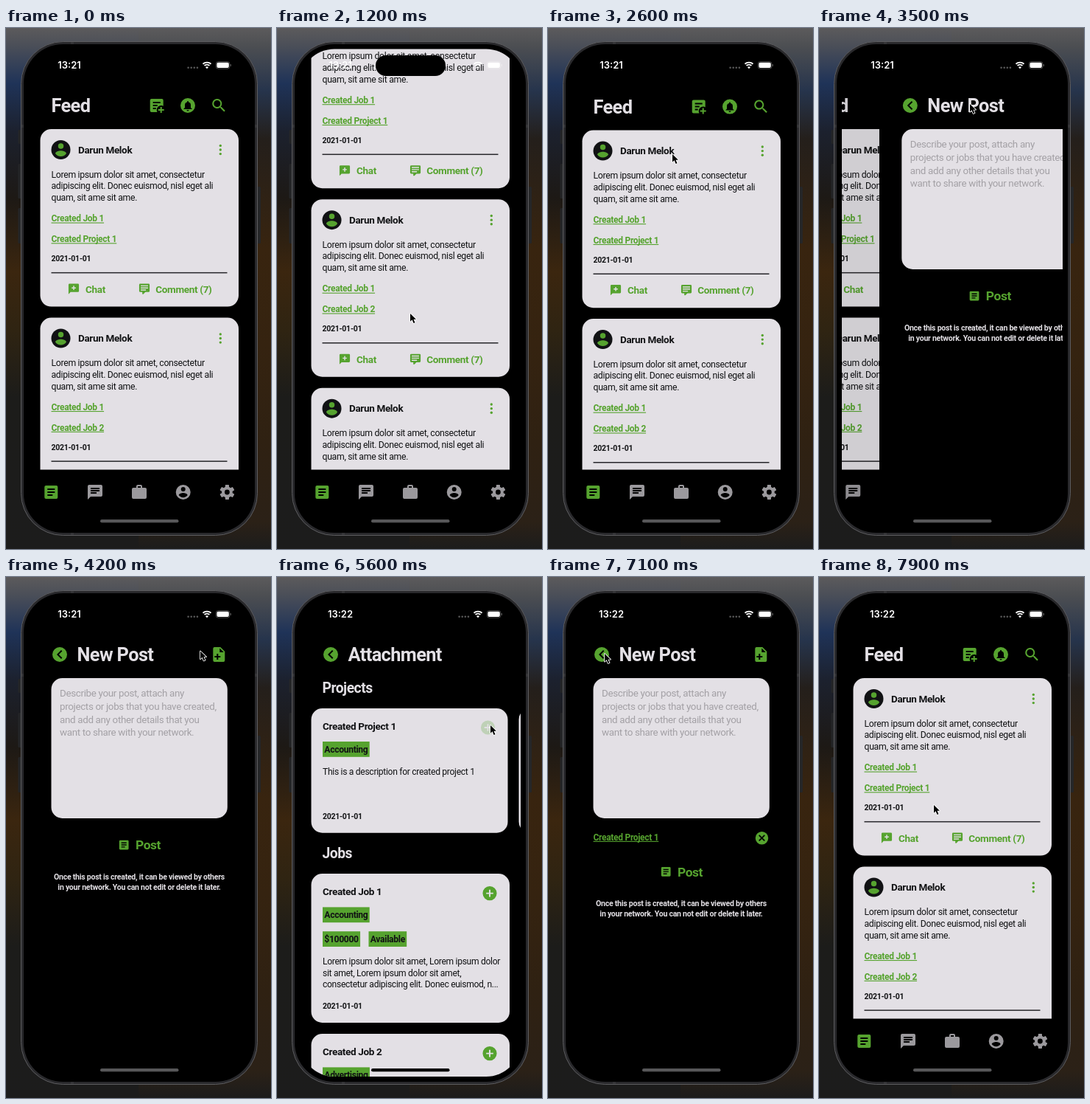
Write an HTML page with a canvas that moves like this. It is 360 px wide and 706 px high and loops after 8 s.

```html
<!DOCTYPE html>
<html lang="en">
<head>
<meta charset="utf-8">
<title>Feed app</title>
<style>
  html, body { margin: 0; width: 100%; height: 100%; overflow: hidden; background: #111; }
  canvas { display: block; width: 360px; height: 706px; }
</style>
</head>
<body>
<canvas id="stage"></canvas>
<script>
const LOOP = 8000;
const GREEN = '#56a32f', LIGHT = '#e3e0e5', DARK = '#111214', GRAY = '#9b999d';
const SCREEN = { x: 31, y: 28.5, w: 300, h: 648.5, r: 47 };

const canvas = document.getElementById('stage');
const dpr = window.devicePixelRatio || 1;
canvas.width = 360 * dpr;
canvas.height = 706 * dpr;
const ctx = canvas.getContext('2d');

const DISC = 'M12 2a10 10 0 1 0 0 20 10 10 0 1 0 0-20';
const SHEET = 'M5 3h14a2 2 0 0 1 2 2v14a2 2 0 0 1-2 2H5a2 2 0 0 1-2-2V5a2 2 0 0 1 2-2';
const BUBBLE = 'M20 2H4a2 2 0 0 0-2 2v18l4-4h14a2 2 0 0 0 2-2V4a2 2 0 0 0-2-2';
const PERSON = 'M12 5a3 3 0 1 0 0 6 3 3 0 1 0 0-6M12 19.2C9.5 19.2 7.3 17.9 6 16C6 14 10 12.9 12 12.9C14 12.9 18 14 18 16C16.7 17.9 14.5 19.2 12 19.2';
const icons = {
  sheet: SHEET + 'M7 7h10v2H7zM7 11h10v2H7zM7 15h7v2H7z',
  sheetPlus: 'M17 14h2v3h3v2h-3v3h-2v-3h-3v-2h3zM5 3h14a2 2 0 0 1 2 2v7.8a5 5 0 0 0-3-.8 6 6 0 0 0-6 6 6 6 0 0 0 .8 3H5a2 2 0 0 1-2-2V5a2 2 0 0 1 2-2M7 7h10v2H7zM7 11h6v2H7zM7 15h4v2H7z',
  bell: DISC + 'M12 6a1 1 0 0 1 1 1v.4a4 4 0 0 1 3 3.9V15l1.5 1.3v.7h-11v-.7L8 15v-3.7a4 4 0 0 1 3-3.9V7a1 1 0 0 1 1-1m-1.5 12h3a1.5 1.5 0 0 1-3 0z',
  search: 'M9.5 3a6.5 6.5 0 0 1 4.9 10.7l.3.3h.8l5 5-1.5 1.5-5-5v-.8l-.3-.3A6.5 6.5 0 1 1 9.5 3m0 2a4.5 4.5 0 1 0 0 9 4.5 4.5 0 1 0 0-9',
  message: BUBBLE + 'M6 6h12v2H6zM6 9h12v2H6zM6 12h8v2H6z',
  chat: BUBBLE + 'M11 6h2v3h3v2h-3v3h-2v-3H8V9h3z',
  comment: 'M4 2h16a2 2 0 0 1 2 2v12a2 2 0 0 1-2 2h-6l-3.8 3.7Q8 22.5 8 21v-3H4a2 2 0 0 1-2-2V4a2 2 0 0 1 2-2M5 5h14v2H5zM5 9h14v2H5zM5 13h10v2H5z',
  briefcase: 'M10 2h4a2 2 0 0 1 2 2v2h4a2 2 0 0 1 2 2v11a2 2 0 0 1-2 2H4a2 2 0 0 1-2-2V8a2 2 0 0 1 2-2h4V4a2 2 0 0 1 2-2m0 2v2h4V4z',
  account: DISC + PERSON,
  person: PERSON,
  back: DISC + 'M15.4 16.6L10.8 12l4.6-4.6L14 6l-6 6 6 6z',
  filePlus: 'M14 2H6a2 2 0 0 0-2 2v16a2 2 0 0 0 2 2h12a2 2 0 0 0 2-2V8zM13 3.5L18.5 9H13zM11 11v3h3v2h-3v3H9v-3H6v-2h3v-3z',
  plus: DISC + 'M11 7h2v4h4v2h-4v4h-2v-4H7v-2h4z',
  close: DISC + 'M8.4 7L12 10.6 15.6 7 17 8.4 13.4 12l3.6 3.6-1.4 1.4-3.6-3.6L8.4 17 7 15.6l3.6-3.6L7 8.4z'
};
for (const k in icons) icons[k] = new Path2D(icons[k]);
const arrow = new Path2D('M0 0V12.2L2.9 9.5 5.2 14.7 7.4 13.8 5.1 8.7H9z');

const clamp = v => Math.max(0, Math.min(1, v));
const smooth = v => v * v * (3 - 2 * v);
const easeOut = (t, start, len) => 1 - Math.pow(1 - clamp((t - start) / len), 3);

// Eased interpolation through [time, ...values] keys
function track(keys, t) {
  if (t <= keys[0][0]) return keys[0].slice(1);
  for (let i = 1; i < keys.length; i++) {
    const a = keys[i - 1], b = keys[i];
    if (t <= b[0]) {
      const p = smooth((t - a[0]) / (b[0] - a[0]));
      return a.slice(1).map((v, j) => v + (b[j + 1] - v) * p);
    }
  }
  return keys[keys.length - 1].slice(1);
}

// Opacity of a touched button
function press(t, at) {
  return 1 - 0.75 * clamp((t - at) / 60) * (1 - clamp((t - at - 130) / 200));
}

function box(x, y, w, h, r, fill) {
  ctx.beginPath();
  ctx.roundRect(x, y, w, h, r);
  ctx.fillStyle = fill;
  ctx.fill();
}

function disc(x, y, r, fill) {
  ctx.beginPath();
  ctx.arc(x, y, r, 0, Math.PI * 2);
  ctx.fillStyle = fill;
  ctx.fill();
}

// Slightly tightened tracking for a narrow look
function setFont(size, weight) {
  ctx.font = `${weight} ${size}px Roboto, sans-serif`;
  ctx.letterSpacing = `${-0.025 * size}px`;
}

function text(str, x, y, size, color = DARK, weight = 700, align = 'left') {
  setFont(size, weight);
  ctx.textAlign = align;
  ctx.fillStyle = color;
  ctx.fillText(str, x, y);
  return ctx.measureText(str).width;
}

function lines(list, x, y, step, size, color, weight, align) {
  list.forEach((s, i) => text(s, x, y + i * step, size, color, weight, align));
}

function link(str, x, y) {
  const w = text(str, x, y, 12, GREEN);
  ctx.fillRect(x, y + 1.3, w, 1.1);
}

function icon(name, x, y, size = 24, color = GREEN, alpha = 1) {
  ctx.save();
  ctx.globalAlpha *= alpha;
  ctx.translate(x, y);
  ctx.scale(size / 24, size / 24);
  ctx.translate(-12, -12);
  ctx.fillStyle = color;
  ctx.fill(icons[name], 'evenodd');
  ctx.restore();
}

function cog(x, y) {
  ctx.save();
  ctx.translate(x, y);
  ctx.fillStyle = GRAY;
  for (let i = 0; i < 6; i++) {
    ctx.beginPath();
    ctx.roundRect(-2.6, -10, 5.2, 5, 0.8);
    ctx.fill();
    ctx.rotate(Math.PI / 3);
  }
  ctx.beginPath();
  ctx.arc(0, 0, 5.4, 0, Math.PI * 2);
  ctx.lineWidth = 4;
  ctx.strokeStyle = GRAY;
  ctx.stroke();
  ctx.restore();
}

function postCard(y, links) {
  const shift = links.length * 27.8;
  box(46.5, y, 269.5, 185 + shift, 15, LIGHT);
  disc(74.5, y + 28, 13, DARK);
  icon('person', 74.5, y + 28, 30);
  text('Darun Melok', 98, y + 32.8, 13.5);
  for (const dy of [-5.6, 0, 5.6]) disc(291.3, y + 28 + dy, 1.7, GREEN);
  lines(['Lorem ipsum dolor sit amet, consectetur', 'adipiscing elit. Donec euismod, nisl eget ali', 'quam, sit ame sit ame.'],
    61.5, y + 65.5, 15.8, 12.25, DARK, 400);
  links.forEach((s, i) => link(s, 61.5, y + 125.2 + i * 27.8));
  const d = y + shift;
  text('2021-01-01', 61.5, d + 123.5, 10.5);
  ctx.fillStyle = '#26262a';
  ctx.fillRect(61.5, d + 138.3, 239, 1.5);
  icon('chat', 92, d + 161, 17);
  text('Chat', 108, d + 166, 13.5, GREEN);
  icon('comment', 188, d + 161, 17);
  text('Comment (7)', 203.3, d + 166, 13.5, GREEN);
}

function feed(t) {
  const [scroll] = track([[450, 0], [1350, 173], [2050, 173], [2480, -5], [2600, -1.6], [2760, 0]], t);
  ctx.save();
  ctx.beginPath();
  ctx.rect(0, 0, 360, 598.5);
  ctx.clip();
  ctx.translate(0, -scroll);
  text('Feed', 61.5, 114.2, 25.4, LIGHT);
  icon('sheetPlus', 204.7, 105, 24, GREEN, press(t, 3220));
  icon('bell', 247, 105);
  icon('search', 289.3, 105);
  postCard(137, ['Created Job 1', 'Created Project 1']);
  postCard(392.5, ['Created Job 1', 'Created Job 2']);
  postCard(648, []);
  ctx.restore();
  icon('sheet', 61.3, 629);
  icon('message', 121, 629, 24, GRAY);
  icon('briefcase', 181, 629, 24, GRAY);
  icon('account', 240.7, 629, 24, GRAY);
  cog(300.4, 629);
}

function header(title, alpha) {
  icon('back', 73, 105, 24, GREEN, alpha);
  text(title, 96.5, 114.2, 25.4, LIGHT);
}

function newPost(t) {
  const attached = t > 5650;
  const y = attached ? 36.4 : 0;
  header('New Post', press(t, 7130));
  icon('filePlus', 289.3, 105, 24, GREEN, press(t, 4420));
  box(61.5, 137, 239.3, 190, 15, LIGHT);
  lines(['Describe your post, attach any', 'projects or jobs that you have created,', 'and add any other details that you', 'want to share with your network.'],
    73, 162.3, 17.7, 13.4, '#a3a0a5', 400);
  if (attached) {
    link('Created Project 1', 61.5, 356.5);
    icon('close', 290.5, 353.7, 21);
  }
  icon('sheet', 160.2, 363 + y, 17);
  text('Post', 176, 369.3 + y, 17.4, GREEN);
  lines(['Once this post is created, it can be viewed by others', 'in your network. You can not edit or delete it later.'],
    181, 409.8 + y, 13.9, 10.55, LIGHT, 700, 'center');
}

function tag(str, x, y) {
  setFont(12.1, 700);
  ctx.fillStyle = GREEN;
  ctx.fillRect(x, y, ctx.measureText(str).width + 4.6, 20.8);
  text(str, x + 2.3, y + 14.6, 12.1);
}

function jobCard(y, title, field) {
  box(46.5, y, 269.5, 202, 15, LIGHT);
  text(title, 62, y + 29.3, 13.5);
  icon('plus', 289, y + 26.6, 23);
  tag(field, 62, y + 45.4);
  tag('$100000', 62, y + 78.2);
  tag('Available', 124.5, y + 78.2);
  lines(['Lorem ipsum dolor sit amet, Lorem ipsum dolor', 'sit amet, Lorem ipsum dolor sit amet,', 'consectetur adipiscing elit. Donec euismod, n...'],
    62, y + 123, 15.7, 12.1, DARK, 400);
  text('2021-01-01', 62, y + 183, 10.5);
}

function attachment(t) {
  header('Attachment', press(t, 6480));
  text('Projects', 61.5, 156.7, 19.3, LIGHT);
  box(46.5, 178, 267, 168.7, 15, LIGHT);
  box(328.5, 178, 267, 168.7, 15, LIGHT);
  text('Created Project 1', 62, 207, 13.5);
  icon('plus', 286.5, 204, 23, GREEN, press(t, 5510));
  tag('Accounting', 62, 223);
  text('This is a description for created project 1', 62, 268, 12.1, DARK, 400);
  text('2021-01-01', 62, 328, 10.5);
  text('Jobs', 61.5, 381.3, 19.3, LIGHT);
  jobCard(402, 'Created Job 1', 'Accounting');
  jobCard(619, 'Created Job 2', 'Advertising');
}

// Push transition: the lower page drifts left while the upper one slides over it
function stack(p, under, over) {
  if (p < 1) {
    ctx.save();
    ctx.translate(-0.3 * SCREEN.w * p, 0);
    under();
    ctx.restore();
    if (p > 0) {
      ctx.fillStyle = `rgba(0,0,0,${0.1 * p})`;
      ctx.fillRect(SCREEN.x, SCREEN.y, SCREEN.w, SCREEN.h);
    }
  }
  if (p > 0) {
    ctx.save();
    ctx.translate(SCREEN.w * (1 - p), 0);
    ctx.beginPath();
    ctx.rect(SCREEN.x, SCREEN.y, SCREEN.w, SCREEN.h);
    ctx.clip();
    ctx.fillStyle = '#000';
    ctx.fillRect(SCREEN.x, SCREEN.y, SCREEN.w, SCREEN.h);
    over();
    ctx.restore();
  }
}

function wall(x, w, stops) {
  const g = ctx.createLinearGradient(0, 0, 0, 706);
  stops.forEach(([y, c]) => g.addColorStop(y / 706, c));
  ctx.fillStyle = g;
  ctx.fillRect(x, 0, w, 706);
}

function phone() {
  wall(0, 180, [[0, '#5c5b5c'], [25, '#4a4e58'], [75, '#1f3358'], [140, '#1c212e'], [230, '#1d1915'], [330, '#3b260f'], [410, '#2f2412'], [500, '#1c1c1a'], [706, '#1c1c1c']]);
  wall(180, 180, [[0, '#5c5b5c'], [25, '#4c4e52'], [85, '#26344c'], [150, '#241f1b'], [300, '#38240f'], [430, '#352310'], [560, '#2f2112'], [670, '#2b2117'], [706, '#1c1c1c']]);
  for (const [x, y, h] of [[16.5, 138, 19], [16.5, 184, 47], [16.5, 244, 48], [341, 215, 77]]) box(x, y, 5, h, 1.5, '#252628');
  box(20.5, 18.5, 321, 669, 57, '#29292c');
  ctx.lineWidth = 1;
  ctx.strokeStyle = '#5c5c5f';
  ctx.stroke();
  box(24, 22, 314, 662, 53.5, '#000');
  ctx.fillStyle = '#343437';
  for (const [x, y, w, h] of [[88, 19, 4, 3], [88, 684, 4, 3], [21, 131, 3, 4], [338, 131, 3, 4]]) ctx.fillRect(x, y, w, h);
}

function statusBar(t) {
  const faint = 'rgba(255,255,255,0.35)';
  box(134, 37, 95, 28, 14, '#000');
  ctx.font = '600 13px Inter, sans-serif';
  ctx.letterSpacing = '0px';
  ctx.textAlign = 'center';
  ctx.fillStyle = '#fff';
  ctx.fillText(t < 5000 ? '13:21' : '13:22', 86, 55.3);
  for (let i = 0; i < 4; i++) disc(247.6 + i * 4.1, 53.7, 1.3, faint);
  ctx.strokeStyle = '#fff';
  ctx.lineWidth = 1.9;
  for (const r of [8, 4.9]) {
    ctx.beginPath();
    ctx.arc(273, 54.6, r, -2.33, -0.81);
    ctx.stroke();
  }
  ctx.beginPath();
  ctx.moveTo(273, 55.2);
  ctx.arc(273, 55.2, 2.8, -2.36, -0.78);
  ctx.fillStyle = '#fff';
  ctx.fill();
  ctx.beginPath();
  ctx.roundRect(285.3, 45.6, 18.6, 9.6, 3);
  ctx.strokeStyle = faint;
  ctx.lineWidth = 0.8;
  ctx.stroke();
  box(286.4, 46.7, 16.4, 7.4, 2, '#fff');
  box(304.7, 48.9, 1.2, 3, 0.6, faint);
}

function cursor(t) {
  if (t < 100) return;
  const [x, y] = track([[100, 349, 430], [300, 340, 425], [850, 181, 387], [2200, 181, 387], [2600, 169, 171], [2950, 200, 106], [3120, 205, 103],
    [3950, 205, 103], [4200, 264, 100.5], [4380, 287, 102], [4950, 287, 102], [5420, 290, 201], [5800, 290, 201], [6380, 77, 104],
    [7350, 77, 104], [7850, 156, 309]], t);
  ctx.save();
  ctx.translate(x, y);
  ctx.scale(0.88, 0.88);
  ctx.lineJoin = 'round';
  ctx.lineWidth = 1.9;
  ctx.strokeStyle = '#fff';
  ctx.stroke(arrow);
  ctx.fillStyle = '#000';
  ctx.fill(arrow);
  ctx.restore();
}

function draw(t) {
  ctx.setTransform(dpr, 0, 0, dpr, 0, 0);
  phone();
  const post = easeOut(t, 3300, 450) - easeOut(t, 7200, 450);
  const attach = easeOut(t, 4500, 450) - easeOut(t, 6550, 450);
  ctx.save();
  ctx.beginPath();
  ctx.roundRect(SCREEN.x, SCREEN.y, SCREEN.w, SCREEN.h, SCREEN.r);
  ctx.clip();
  stack(post, () => feed(t), () => stack(attach, () => newPost(t), () => attachment(t)));
  ctx.restore();
  statusBar(t);
  box(128, 666, 106.5, 4.3, 2.2, attach > 0.5 ? '#000' : '#575759');
  cursor(t);
}

const begin = performance.now();
function tick() {
  draw((performance.now() - begin) % LOOP);
  requestAnimationFrame(tick);
}
tick();
</script>
</body>
</html>
```
